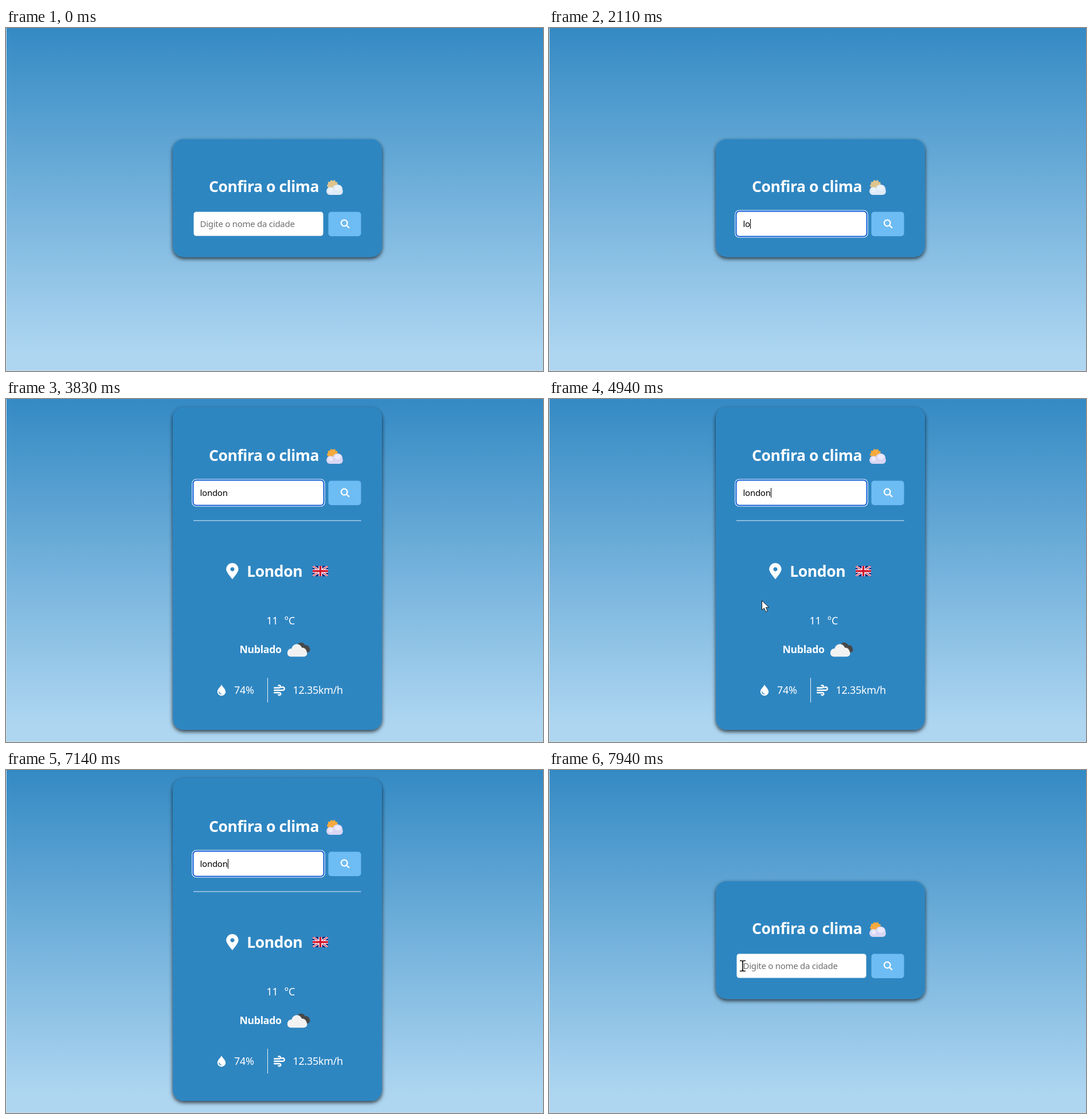
Write an HTML page that moves like this. It is 937x598 px and loops after 8 s.

```html
<!DOCTYPE html>
<html lang="pt-BR">
<head>
<meta charset="utf-8">
<title>Confira o clima</title>
<style>
  html, body { margin: 0; width: 100%; height: 100%; overflow: hidden; background: #aed6f1; }
  svg { display: block; width: 100%; height: 100%; }
  text { font: 18px "Noto Sans", "Open Sans", sans-serif; letter-spacing: -.018em; fill: #fff; white-space: pre; }
  .title { font-size: 26.6px; font-weight: 700; }
  .bold { font-size: 17.7px; font-weight: 700; }
  .field { font-size: 15px; fill: #6e6e6e; }
  #typed { fill: #000; }
  .line { fill: none; stroke: #fff; stroke-linecap: round; stroke-linejoin: round; }
  #emoji { --sun: #f6aa3e; --cloud: #d8d6f3; --shine: #ebe9fb; }
  #emoji.pale { --sun: #dfc48d; --cloud: #dfeaf7; --shine: #e9f2fb; }
</style>
</head>
<body>
<svg viewBox="0 0 937 598" preserveAspectRatio="none">
  <defs>
    <linearGradient id="sky" x1="0" y1="0" x2="0" y2="1">
      <stop offset="0" stop-color="#348ac4"/>
      <stop offset=".95" stop-color="#aed6f1"/>
    </linearGradient>
    <filter id="shadow" x="-10%" y="-15%" width="120%" height="130%">
      <feDropShadow dx="0" dy="3" stdDeviation="3.6" flood-color="#000" flood-opacity=".75"/>
    </filter>
    <clipPath id="flagBox"><rect x="535" y="291" width="27" height="18"/></clipPath>
  </defs>

  <rect width="937" height="598" fill="url(#sky)"/>
  <path d="M.5 0V598M0 597.6H937" stroke="#d3dde4" stroke-width="1"/>
  <rect id="card" x="291" width="365" rx="19" fill="#2e86c1" filter="url(#shadow)"/>

  <g id="head">
    <text class="title" x="354" y="286">Confira o clima</text>
    <g id="emoji">
      <g style="fill:var(--sun);stroke:var(--sun)">
        <circle cx="570" cy="275" r="8.5" stroke="none"/>
        <circle cx="570" cy="275" r="8" fill="none" stroke-width="4.2" stroke-linecap="round" stroke-dasharray="0 5.026"/>
      </g>
      <g style="fill:var(--cloud)">
        <circle cx="566" cy="284" r="6.8"/>
        <circle cx="578.5" cy="281.5" r="8.8"/>
        <rect x="559.3" y="279" width="28.6" height="12" rx="6"/>
      </g>
      <g style="fill:var(--shine)">
        <circle cx="566.5" cy="282.5" r="4"/>
        <ellipse cx="579" cy="279" rx="6" ry="4.5"/>
      </g>
    </g>
    <g id="ring">
      <rect x="324.3" y="317.5" width="232.4" height="48" rx="7.5" fill="#fff"/>
      <rect x="325.4" y="318.6" width="230.2" height="45.8" rx="6.5" fill="#0d5bd7"/>
    </g>
    <rect id="box" x="327.5" y="320.5" width="226" height="42" rx="4.5" fill="#fff"/>
    <text class="field" id="hint" x="338.5" y="347">Digite o nome da cidade</text>
    <text class="field" id="typed" x="338.5" y="347"></text>
    <rect id="caret" y="333" width="1" height="17"/>
    <rect x="562.5" y="320.5" width="57" height="42.5" rx="5" fill="#6dbcf3"/>
    <g class="line" stroke-width="2.3">
      <circle cx="590.2" cy="340" r="5.3"/>
      <path d="M594.2 344L598.3 348.1"/>
    </g>
  </g>

  <g id="result">
    <path d="M327 212H619.5M456.5 486V529" stroke="#e6f1f9" stroke-width="1"/>
    <path fill="#fff" fill-rule="evenodd" d="M395 314.3C391 309 384.2 301.8 384.2 296.8a10.7 10.7 0 0 1 21.4 0C405.6 301.8 399 309 395 314.3zM395 293.2a3.6 3.6 0 1 0 .01 0z"/>
    <text class="title" x="420.3" y="310">London</text>
    <g clip-path="url(#flagBox)">
      <rect x="535" y="291" width="27" height="18" fill="#10217a"/>
      <path d="M535 291L562 309M562 291L535 309" stroke="#fff" stroke-width="3.6"/>
      <path d="M535 291L562 309M562 291L535 309" stroke="#d0142c" stroke-width="1.2"/>
      <path d="M548.5 291V309M535 300H562" stroke="#fff" stroke-width="6"/>
      <path d="M548.5 291V309M535 300H562" stroke="#d0142c" stroke-width="3.4"/>
    </g>
    <text x="454.5" y="393">11</text>
    <text x="485.5" y="393">°C</text>
    <text class="bold" x="407.5" y="443">Nublado</text>
    <g fill="#484848">
      <circle cx="515" cy="431.5" r="7"/>
      <circle cx="523.5" cy="435" r="6"/>
      <rect x="508" y="432" width="22.5" height="10" rx="5"/>
    </g>
    <g fill="#f2f2f2">
      <circle cx="507.5" cy="436.5" r="9.2"/>
      <circle cx="517" cy="441" r="7.5"/>
      <circle cx="498" cy="442" r="7"/>
      <rect x="491" y="437.5" width="34.5" height="11.8" rx="5.9"/>
    </g>
    <path fill="#fff" d="M376 498C378 502 383.2 506 383.2 510.4a7.2 7 0 0 1-14.4 0C368.8 506 374 502 376 498z"/>
    <path class="line" stroke="#2e86c1" stroke-width="1.3" style="stroke:#2e86c1" d="M371.8 510.5a4 4 0 0 0 4 3.7"/>
    <text x="398" y="514">74%</text>
    <path class="line" stroke-width="2.4" d="M468.2 503.5H477a2.2 2.2 0 1 0-1.6-3.9M468.2 507.8H483a2.8 2.8 0 1 0-2-4.8M468.2 512H477a2.2 2.2 0 1 1-1.6 3.6"/>
    <text x="500.5" y="514">12.35km/h</text>
  </g>

  <circle id="click" cx="369" cy="349.5" r="13" fill="#fff22e" opacity=".72"/>
  <g id="beam" fill="none">
    <path d="M-5-9H-2Q0-9 0-7V7Q0 9-2 9H-5M5-9H2Q0-9 0-7M0 7Q0 9 2 9H5" stroke="#fff" stroke-width="3" stroke-opacity=".6"/>
    <path d="M-5-9H-2Q0-9 0-7V7Q0 9-2 9H-5M5-9H2Q0-9 0-7M0 7Q0 9 2 9H5" stroke="#111" stroke-width="1.7"/>
  </g>
  <path id="arrow" d="M.5.5V17L4.3 13.4L7.3 20L10.2 18.7L7.3 12.3H12.7z" fill="#fff" stroke="#1c1c1c" stroke-width="1"/>
</svg>

<script>
const LOOP = 8000;
const RESULT_ON = 3830, RESULT_OFF = 7340;
const ids = ["card", "head", "emoji", "ring", "hint", "typed", "caret", "result", "click", "beam", "arrow"];
const el = Object.fromEntries(ids.map(id => [id, document.getElementById(id)]));

// [time, letters typed]
const typing = [[0, 0], [1910, 1], [2110, 2], [2310, 3], [2710, 4], [2810, 5], [3010, 6], [RESULT_OFF, 0]];
const caretOn = [[1120, 1610], [1910, 3330], [3930, 4430], [4940, 5440], [6140, 6650], [7140, RESULT_OFF]];

// [time, shape, x, y]
const pointer = [
  [0], [190, "arrow", 788, 524], [290, "arrow", 655, 465], [390, "arrow", 500, 402],
  [490, "beam", 391, 350], [590, "beam", 347, 334], [790, "beam", 371, 351], [1910],
  [4850, "arrow", 371, 351], [4950, "arrow", 360, 357], [5050, "arrow", 352, 364],
  [5150, "arrow", 354, 371], [5250, "arrow", 367, 377], [5350, "arrow", 388, 382],
  [5440, "arrow", 410, 385], [5540, "arrow", 428, 387], [5640, "arrow", 436, 388],
  [5740, "arrow", 478, 372], [5840, "arrow", 505, 335], [5940, "arrow", 466, 268],
  [6040, "arrow", 370, 204], [6140, "arrow", 240, 150], [6240, "arrow", 133, 114], [6340],
  [7440, "arrow", 0, 138], [7540, "arrow", 72, 186], [7640, "arrow", 160, 244],
  [7740, "arrow", 245, 296], [7840, "arrow", 308, 330], [7940, "beam", 338, 341.5]
];

const current = (steps, t) => steps.findLast(step => step[0] <= t);
const within = (t, from, to) => t >= from && t < to;
const show = (node, on) => node.setAttribute("visibility", on ? "visible" : "hidden");
const move = (node, x, y) => node.setAttribute("transform", `translate(${x} ${y})`);

function draw(t) {
  const open = within(t, RESULT_ON, RESULT_OFF);
  el.card.setAttribute("y", open ? 14.5 : 193.8);
  el.card.setAttribute("height", open ? 562.5 : 205.5);
  move(el.head, 0, open ? -178 : 0);
  show(el.result, open);
  el.emoji.classList.toggle("pale", t < RESULT_ON);

  const text = "london".slice(0, current(typing, t)[1]);
  if (el.typed.textContent !== text) el.typed.textContent = text;
  show(el.hint, !text);
  show(el.ring, within(t, 1120, RESULT_OFF));
  show(el.caret, caretOn.some(([from, to]) => within(t, from, to)));
  el.caret.setAttribute("x", text ? Math.round(339 + el.typed.getComputedTextLength()) : 339);

  show(el.click, within(t, 1120, 1200));
  const [, shape, x, y] = current(pointer, t);
  for (const name of ["arrow", "beam"]) show(el[name], name === shape);
  if (shape) move(el[shape], x, y);
}

const start = performance.now();
function tick() {
  draw((performance.now() - start) % LOOP);
  requestAnimationFrame(tick);
}
tick();
</script>
</body>
</html>
```
